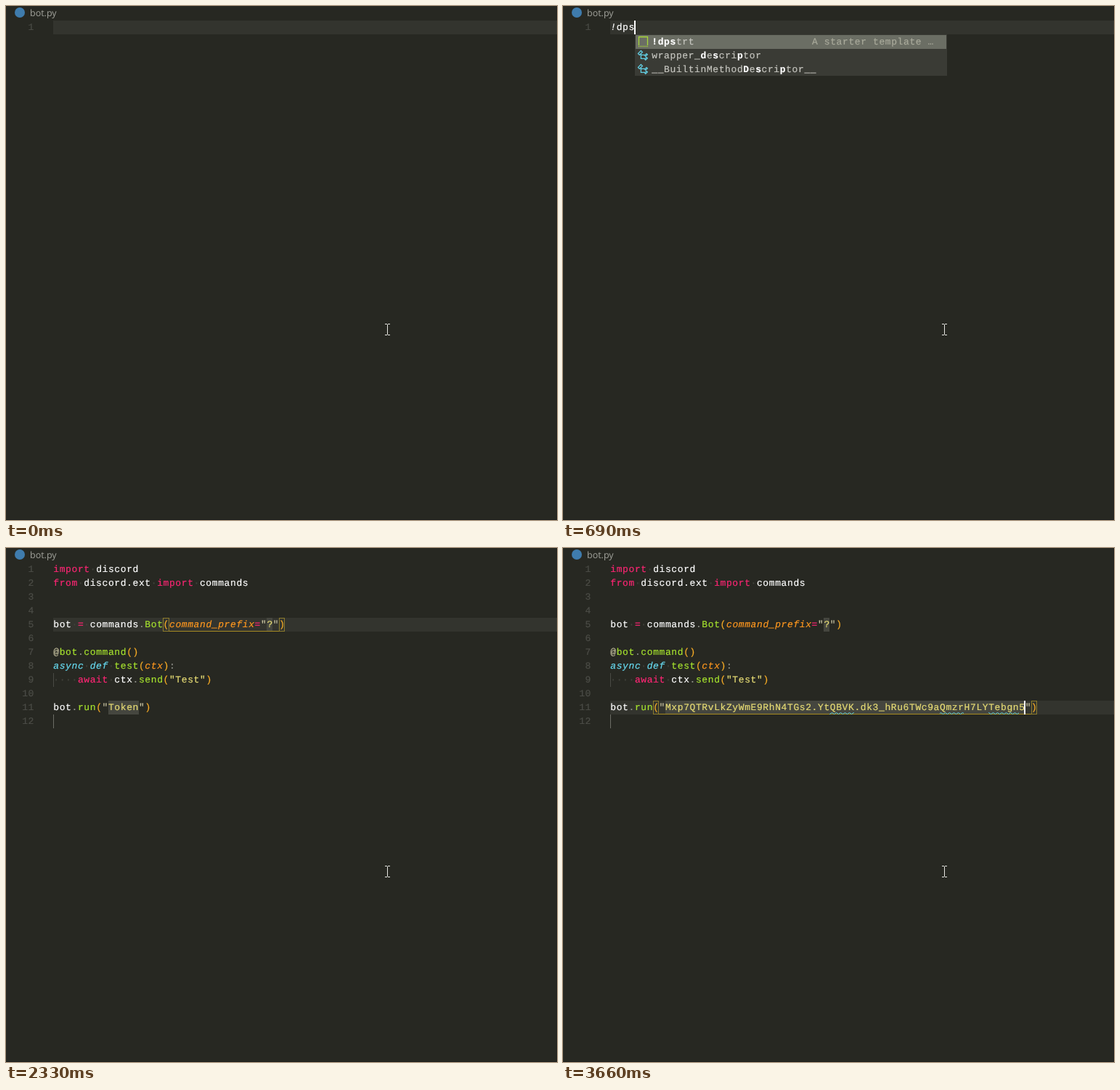
Animation, 759 px wide and 707 px high, one loop 3.89 s. Source, as an HTML page:

```html
<!DOCTYPE html>
<html lang="en">
<head>
<meta charset="utf-8">
<title>bot.py</title>
<style>
  html, body { margin: 0; width: 100%; height: 100%; overflow: hidden; background: #272822; }
  #stage {
    position: relative; width: 759px; height: 707px; overflow: hidden;
    box-sizing: border-box; color: #fff;
    font: 13px/19px "Courier New", "Liberation Mono", monospace;
    letter-spacing: .6px; /* keeps the 8.4px column */
    -webkit-text-stroke: .2px;
    text-rendering: geometricPrecision;
  }
  #stage > *, .row > * { position: absolute; }
  [hidden] { display: none !important; }
  pre { margin: 0; font: inherit; }

  .edge { inset: 0; border: solid #1e1f1c; border-width: 0 1px 1px 0; }
  .logo { left: 12px; top: 2px; width: 14px; height: 14px; border-radius: 50%; background: #3f7cad; }
  .file {
    left: 33px; top: 0; color: #a2a39c; letter-spacing: 0; -webkit-text-stroke: 0;
    font: 12.5px/19px "Open Sans", "Noto Sans", sans-serif;
  }
  .nums { left: 0; top: 20px; width: 39px; text-align: right; color: #4c4d47; }
  .code { left: 65.3px; top: 20px; }

  /* Syntax colours */
  .k { color: #f92672; }
  .f { color: #a6e22e; }
  .s { color: #e6db74; }
  .q { color: #c6c1a0; }
  .g, .b { color: #8f908a; }
  .pairs .b { color: #f7ac26; }
  .p { color: #fd971f; font-style: italic; }
  .d { color: #66d9ef; font-style: italic; }
  .e { font-style: italic; }
  .code i { color: #42433d; font-style: normal; }

  /* Overlays on the character grid: --l line, --c column, --n length */
  .at {
    left: calc(65px + var(--c, 0) * 8.4px);
    top: calc(1px + var(--l) * 19px);
    width: calc(var(--n, 1) * 8.4px);
    height: 19px; box-sizing: border-box;
  }
  .line { width: 694px; background: #33342e; }
  .slot { background: #45463f; }
  .sel { background: #5a5b54; }
  .guide { width: 1px; background: #4a4b45; }
  .stop { width: 1px; background: #6c6d66; }
  .scope { border-bottom: 1px solid #a58a22; }
  .box { border: 1px solid #8d7c2c; }
  .caret { width: 2px; margin-left: -1px; background: #fff; }

  /* Completion list */
  .list {
    top: 39px; width: 430px; box-sizing: border-box; overflow: hidden;
    background: #3a3b35; border: 1px solid #3a3b35; color: #c5c5bf;
  }
  .row { position: relative; height: 19px; white-space: pre; }
  .row.on { background: #6b6e64; }
  .row svg { left: 2px; top: 1px; width: 16px; height: 16px; fill: none; stroke: #62cfe4; stroke-width: 1.3; }
  .row.on svg { stroke: #a6d73a; }
  .row span { left: 22.3px; }
  .row b { color: #fff; }
  .row em { right: 17px; color: #a9aa9b; font-style: normal; }
</style>
</head>
<body>
<div id="stage">
  <div class="edge"></div>
  <div class="logo"></div>
  <div class="file">bot.py</div>

  <div class="at line" style="--l:1" data-on="0-1160"></div>
  <div class="at line" style="--l:5" data-on="1860-2650"></div>
  <div class="at line" style="--l:11" data-on="3580-3890"></div>

  <div class="at slot" style="--l:5;--c:35" data-on="1160-3890"></div>
  <div class="at sel" style="--l:5;--c:35" data-on="1160-1860"></div>
  <div class="at slot" style="--l:11;--c:9;--n:5" data-on="1160-2650"></div>
  <div class="at sel" style="--l:11;--c:9;--n:5" data-on="2650-3580"></div>
  <div class="at slot" style="--l:11;--c:9;--n:59" data-on="3580-3890"></div>
  <div class="at guide" style="--l:9" data-on="1160-3890"></div>
  <div class="at stop" style="--l:12" data-on="1160-3890"></div>

  <pre class="nums">1</pre>
  <pre class="nums" data-on="1160-3890">
&#8203;
2
3
4
5
6
7
8
9
10
11
12</pre>

  <pre class="code" data-on="150-380">!</pre>
  <pre class="code" data-on="380-540"><span class="e">!</span>d</pre>
  <pre class="code" data-on="540-690"><span class="e">!</span>dp</pre>
  <pre class="code" data-on="690-1160"><span class="e">!</span>dps</pre>

  <pre class="code" data-on="1160-3890"><span class="k">import</span><i>·</i>discord
<span class="k">from</span><i>·</i>discord.ext<i>·</i><span class="k">import</span><i>·</i>commands


bot<i>·</i><span class="k">=</span><i>·</i>commands<span class="g">.</span><span class="f">Bot</span><span class="b">(</span><span class="p">command_prefix</span><span class="k">=</span><span class="q">"</span><span class="s"><span data-on="1160-1860">!</span><span data-on="1860-3890">?</span></span><span class="q">"</span><span class="b">)</span>

<span class="q">@</span><span class="f">bot<span class="g">.</span>command</span><span class="b">()</span>
<span class="d">async</span><i>·</i><span class="d">def</span><i>·</i><span class="f">test</span><span class="b">(</span><span class="p">ctx</span><span class="b">)</span><span class="g">:</span>
<i>····</i><span class="k">await</span><i>·</i>ctx<span class="g">.</span><span class="f">send</span><span class="b">(</span><span class="s">"Test"</span><span class="b">)</span>

bot<span class="g">.</span><span class="f">run</span><span class="b">(</span><span class="q">"</span><span class="s"><span data-on="1160-3580">Token</span><span data-on="3580-3890">Mxp7QTRvLkZyWmE9RhN4TGs2.YtQBVK.dk3_hRu6TWc9aQmzrH7LYTebgn5</span></span><span class="q">"</span><span class="b">)</span>
</pre>

  <div class="at scope" style="--l:5;--c:18;--n:20" data-on="1240-2730"></div>
  <div class="at box" style="--l:5;--c:18" data-on="1940-2730"></div>
  <div class="at box" style="--l:5;--c:37" data-on="1940-2730"></div>
  <div class="at scope" style="--l:11;--c:7;--n:9" data-on="2730-3580"></div>
  <div class="at scope" style="--l:11;--c:7;--n:63" data-on="3580-3890"></div>
  <div class="at box" style="--l:11;--c:7" data-on="3660-3890"></div>
  <div class="at box" style="--l:11;--c:69" data-on="3660-3890"></div>

  <svg style="left:0;top:226px" width="759" height="3" data-on="3660-3890">
    <pattern id="wave" width="6" height="3" patternUnits="userSpaceOnUse">
      <path d="M-1.5 .5L1.5 2.5L4.5 .5L7.5 2.5" fill="none" stroke="#5ccfe0"/>
    </pattern>
    <path d="M367 0h34v3h-34zM519 0h33v3h-33zM586 0h42v3h-42z" fill="url(#wave)"/>
  </svg>

  <div class="at caret" style="--l:1;--c:1" data-on="150-380"></div>
  <div class="at caret" style="--l:1;--c:2" data-on="380-540"></div>
  <div class="at caret" style="--l:1;--c:3" data-on="540-690"></div>
  <div class="at caret" style="--l:1;--c:4" data-on="690-1160"></div>
  <div class="at caret" style="--l:5;--c:36" data-on="1160-1630 1860-2330"></div>
  <div class="at caret" style="--l:11;--c:14" data-on="2650-3140"></div>
  <div class="at caret" style="--l:11;--c:68" data-on="3580-3890"></div>

  <div class="list" style="left:90px;height:95px" data-on="540-690" data-items="*!dp*strt|*D*e*p*recationWarning|Pending*D*e*p*recationWarning|wrapper_*d*escri*p*tor|__BuiltinMethod*D*escri*p*tor__"></div>
  <div class="list" style="left:99px;height:57px" data-on="690-1160" data-items="*!dps*trt|wrapper_*d*e*s*cri*p*tor|__BuiltinMethod*D*e*s*cri*p*tor__"></div>

  <svg style="left:521px;top:436px" width="9" height="18" fill="none" stroke="#e8e8e4">
    <path d="M1 1.5H4M5 1.5H8M4.5 2V16M1 16.5H4M5 16.5H8"/>
  </svg>
</div>

<script>
  const LOOP = 3890, PAIRS_AT = 1240;
  const stage = document.getElementById('stage');

  const icon = paths => `<svg viewBox="0 0 16 16">${paths}</svg>`;
  const snippetIcon = icon('<path d="M2.5 13V1.5H14.5V13"/>' +
    '<path d="M2 14.5H15" stroke-dasharray="1 1"/>');
  const classIcon = icon('<path d="M1.5 5.4L5.4 1.5L7.4 3.4L3.4 7.4Z' +
    'M5.4 6V12.4H10.6M5.4 7.4H10.6M10.6 7.9L13 5.6L14.3 6.8L11.7 9.2Z' +
    'M10.6 12.9L13 10.6L14.3 11.8L11.7 14.2Z"/>');

  // Text between asterisks is a matched part of the label.
  const label = text => text.replace(/\*(.+?)\*/g, '<b>$1</b>');

  for (const list of document.querySelectorAll('.list')) {
    list.innerHTML = list.dataset.items.split('|').map((text, i) => i
      ? `<div class="row">${classIcon}<span>${label(text)}</span></div>`
      : `<div class="row on">${snippetIcon}<span>${label(text)}</span><em>A starter template …</em></div>`
    ).join('');
  }

  const parts = [...document.querySelectorAll('[data-on]')].map(el => ({
    el, spans: el.dataset.on.split(' ').map(s => s.split('-').map(Number))
  }));

  function draw() {
    const t = performance.now() % LOOP;
    for (const { el, spans } of parts) {
      el.toggleAttribute('hidden', !spans.some(([from, to]) => t >= from && t < to));
    }
    stage.classList.toggle('pairs', t >= PAIRS_AT);
    requestAnimationFrame(draw);
  }
  draw();
</script>
</body>
</html>
```
